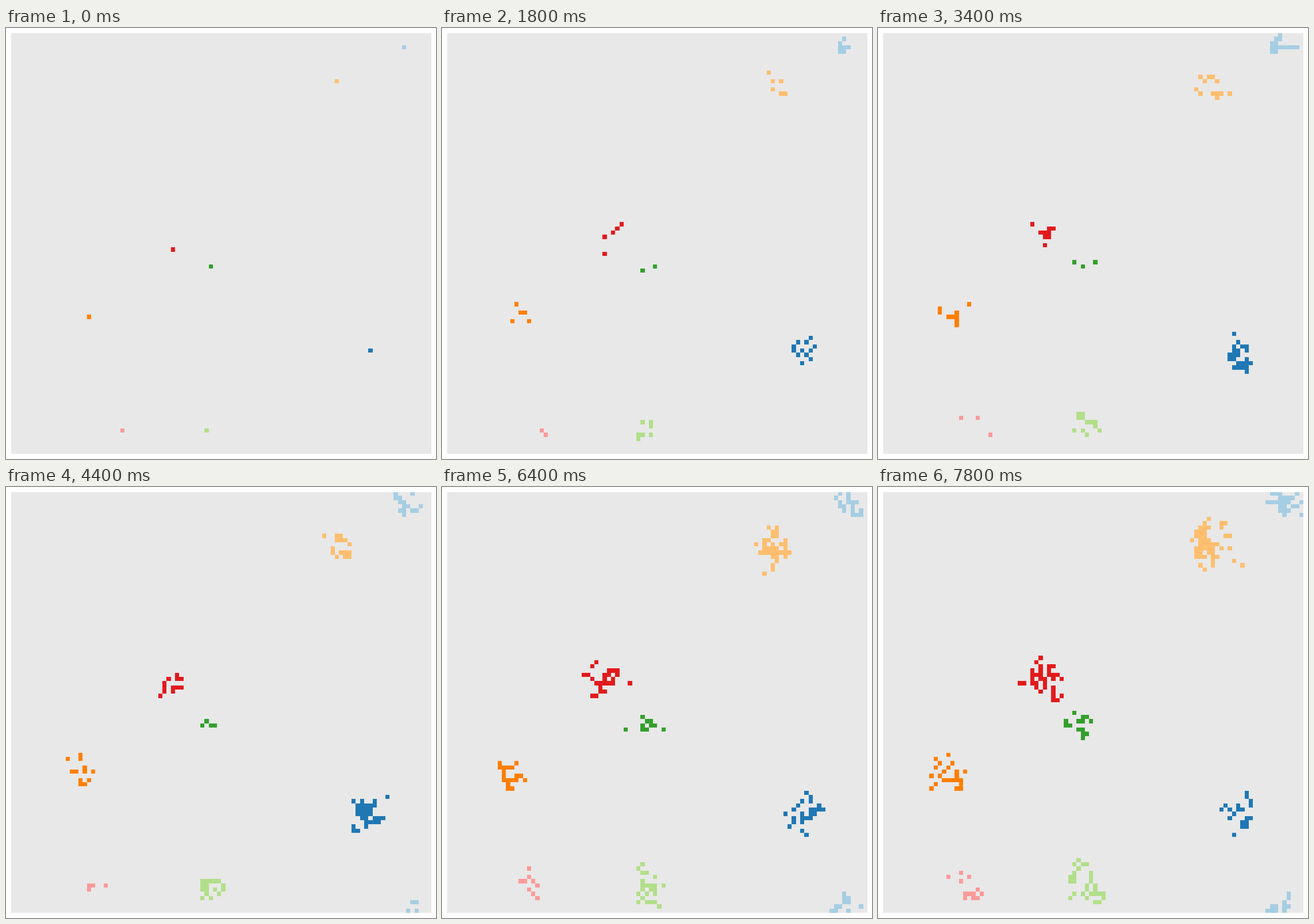
A matplotlib script that plays this animation: 748 by 749 pixels, repeating every 8000 ms.

```python
import math

import numpy as np
import matplotlib.pyplot as plt
from matplotlib.animation import FuncAnimation
from matplotlib.colors import ListedColormap

W, H, DPI = 748, 749, 100
PAD, SIDE = 9, 731      # margin and side of the world, in pixels
GRID = 100              # cells per side; the world wraps around
FRAMES, STEP_MS = 40, 200
MIDDLE = 22             # step at which a colony has its middle size
SURVIVAL = 0.7          # share of a colony that lives on; the rest is newborn
COHESION = 0.9          # share of its offset a cell keeps in each step
BACKGROUND = "#e8e8e8"

# colour, first place, last centre, middle and last size
COLONIES = [
    ("#a6cee3", (93, 3), (95, 0.8), 18, 35),
    ("#1f78b4", (85, 75), (84.2, 76), 30, 19),
    ("#b2df8a", (46, 94), (47.5, 93.3), 16, 28),
    ("#33a02c", (47, 55), (46.5, 54.5), 4, 14),
    ("#fb9a99", (26, 94), (19.2, 93.3), 4, 12),
    ("#e31a1c", (38, 51), (37.5, 43.5), 12, 33),
    ("#fdbf6f", (77, 11), (77.5, 13), 15, 47),
    ("#ff7f00", (18, 67), (14.5, 66), 12, 22),
]


def centre_at(step, first, last):
    """Drift that slows down towards the last centre."""
    eased = 1 - (1 - step / (FRAMES - 1)) ** 1.5
    return np.array(first) + eased * (np.array(last) - first)


def settle(offset, centre, taken, rng):
    """Take a random step of at most one cell, onto a free place if possible."""
    for _ in range(12):
        new = offset + rng.integers(-1, 2, 2)
        place = tuple(np.rint(centre + new).astype(int))
        if place not in taken:
            break
    taken.add(place)
    return new


def advance(offsets, size, centre, rng):
    """Deaths, a move for each survivor, then births beside their parents."""
    survivors = rng.permutation(offsets)[:math.ceil(SURVIVAL * size)]
    survivors = COHESION * (survivors - survivors.mean(axis=0) / 2)
    taken = set()
    cells = [settle(cell, centre, taken, rng) for cell in survivors]
    while len(cells) < size:
        parent = cells[rng.integers(len(cells))]
        cells.append(settle(parent, centre, taken, rng))
    return np.array(cells)


def simulate():
    worlds = np.zeros((FRAMES, GRID, GRID), int)
    for number, (_, first, last, middle, final) in enumerate(COLONIES, 1):
        rng = np.random.default_rng(number)
        offsets = np.zeros((1, 2))
        for step in range(FRAMES):
            centre = centre_at(max(step - 1, 0), first, last)
            if step > 1:
                size = np.interp(step, (1, MIDDLE, FRAMES - 1),
                                 (1, middle, final))
                offsets = advance(offsets, round(size), centre, rng)
            cells = np.rint(centre + offsets).astype(int) % GRID
            worlds[step, cells[:, 1], cells[:, 0]] = number
    return worlds


worlds = simulate()
palette = ListedColormap([BACKGROUND] + [colony[0] for colony in COLONIES])

fig = plt.figure(figsize=(W / DPI, H / DPI), dpi=DPI, facecolor="white")
ax = fig.add_axes([PAD / W, PAD / H, SIDE / W, SIDE / H])
ax.axis("off")
image = ax.imshow(worlds[0], cmap=palette, vmin=0, vmax=len(COLONIES),
                  interpolation="nearest", aspect="auto")


def draw(step):
    image.set_data(worlds[step])
    return (image,)


anim = FuncAnimation(fig, draw, frames=FRAMES, interval=STEP_MS,
                     repeat=True, repeat_delay=0)
plt.show()
```
